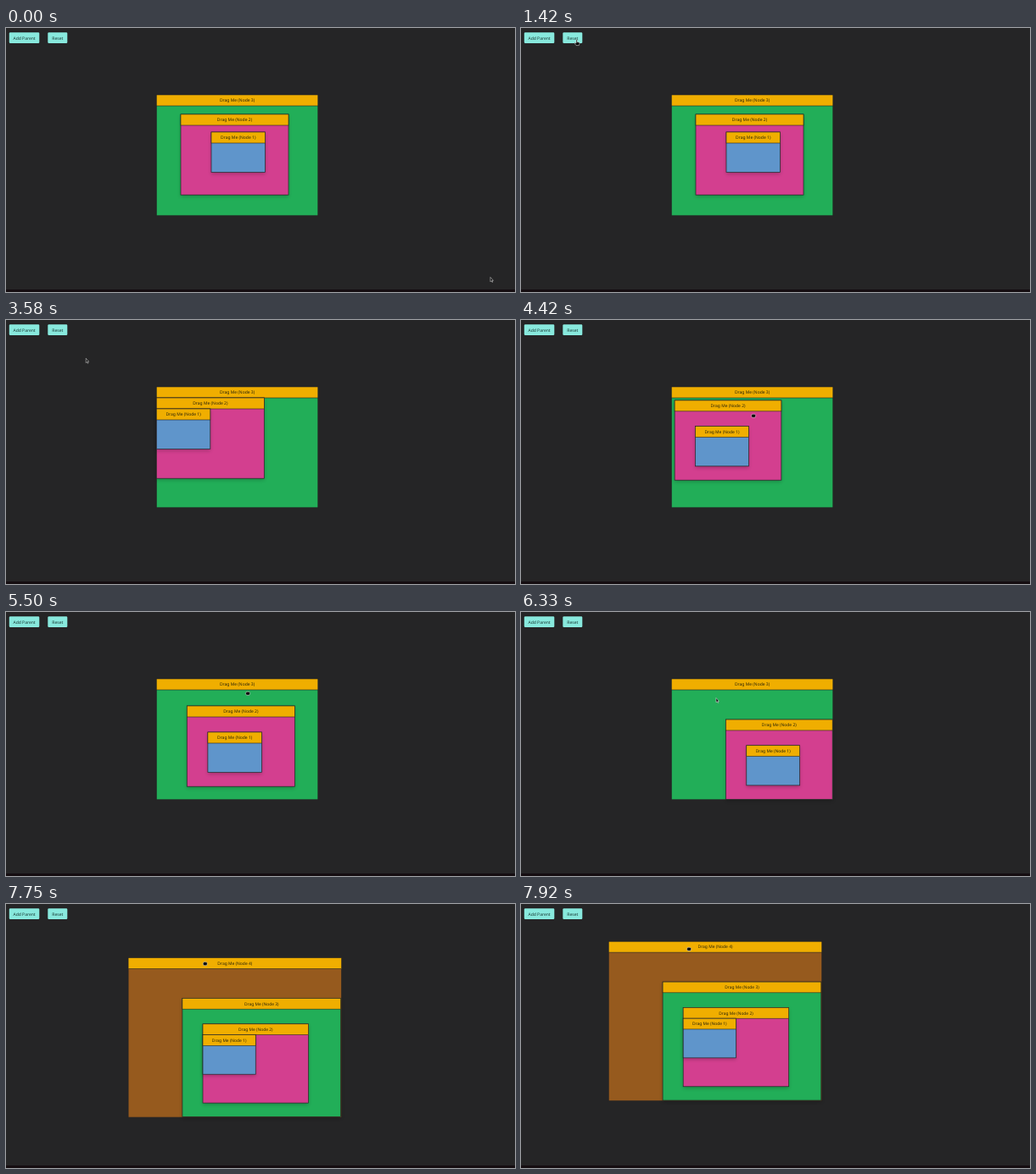
An HTML page for the animation above (8000 ms loop, 600 by 312 pixels).

```html
<!DOCTYPE html>
<html lang="en">
<head>
<meta charset="utf-8">
<title>Nested draggable nodes</title>
<style>
  html, body { margin: 0; width: 100%; height: 100%; overflow: hidden; background: #252526; }
  svg { display: block; width: 100vw; height: 100vh; }
  text {
    font: 5px "Noto Sans", "Open Sans", sans-serif;
    text-anchor: middle;
    text-rendering: geometricPrecision;
    fill: #2b2509;
  }
  .button rect { fill: #88e9dd; }
  .button text { fill: #173733; }
  .node > .body { stroke: #242424; stroke-width: .7; }
  .node > .bar { fill: #f0ae00; stroke: #242424; stroke-width: .6; }
  .node > .shade { fill: #000; opacity: .22; filter: url(#blur); }
  .cursor { fill: #0b0b0b; stroke: #e8e8e8; stroke-width: .5; stroke-linejoin: round; }
</style>
</head>
<body>
<svg id="stage" viewBox="0 0 600 312" preserveAspectRatio="none">
  <defs>
    <filter id="blur" x="-20%" y="-20%" width="140%" height="140%">
      <feGaussianBlur stdDeviation="2"/>
    </filter>
  </defs>
  <rect width="600" height="312" fill="#252526"/>
  <rect y="309" width="600" height="3" fill="#150d11"/>
</svg>
<script>
const LOOP = 8000;
const UNIT = { w: 63.5, h: 47.6, bar: 13 };
const ROOT = [177.3, 79];
const FILLS = ['#5f95cb', '#d33f8f', '#22ae58', '#965a1e'];
const RESET = 1500, ADD_2 = 2660, ADD_3 = 3000, ADD_4 = 6920;

// Each row: time, then values
const CURSOR = [
  [80, 571, 297], [830, 64, 14], [920, 65, 15], [1420, 66, 17], [1750, 66, 17],
  [2000, 28, 15], [3420, 28, 15], [3830, 222, 111], [4170, 247, 129],
  [4320, 270, 100], [4420, 274, 113], [4950, 296, 112], [5500, 285, 96],
  [5900, 321, 134], [6080, 321, 134], [6750, 33, 39], [6860, 31, 16],
  [6980, 31, 17], [7170, 35, 23], [7580, 272, 88], [7920, 198, 53]
];
const DRAG_1 = [[3830, 0, 13], [4170, 24.6, 31]];
const DRAG_2 = [[4320, 0, 13], [4420, 3.2, 15.5], [4950, 26, 24], [5500, 36, 32], [5900, 63.5, 47.6]];
const DRAG_4 = [[7600, 0, 0], [7920, -75.3, -35.7]];
const GRIP_2 = [[4320, 1], [4400, .99], [5350, .99], [5450, 1], [5600, 1], [5700, .99]];
const GRIP_4 = [[7600, 1], [7680, .99]];

const svg = document.getElementById('stage');

function add(parent, tag, attrs, text) {
  const el = document.createElementNS('http://www.w3.org/2000/svg', tag);
  for (const key in attrs) el.setAttribute(key, attrs[key]);
  if (text) el.textContent = text;
  parent.appendChild(el);
  return el;
}

function track(rows, t) {
  if (t <= rows[0][0]) return rows[0].slice(1);
  const i = rows.findIndex(row => row[0] > t);
  if (i < 0) return rows[rows.length - 1].slice(1);
  const a = rows[i - 1], b = rows[i];
  const p = (t - a[0]) / (b[0] - a[0]);
  const k = p * p * (3 - 2 * p);
  return a.slice(1).map((v, n) => v + (b[n + 1] - v) * k);
}

function addButton(x, w, label) {
  const g = add(svg, 'g', { class: 'button' });
  add(g, 'rect', { x, y: 5.3, width: w, height: 12.7, rx: 1.2 });
  add(g, 'text', { x: x + w / 2, y: 13.5 }, label);
}

function addNode(parent, n) {
  const w = UNIT.w * n, h = UNIT.h * n;
  const el = add(parent, 'g', { class: 'node' });
  const shade = add(el, 'rect', { class: 'shade', y: 2, width: w, height: h });
  add(el, 'rect', { class: 'body', width: w, height: h, fill: FILLS[n - 1] });
  add(el, 'rect', { class: 'bar', width: w, height: UNIT.bar });
  add(el, 'text', { x: w / 2, y: 8.3 }, `Drag Me (Node ${n})`);
  return { el, shade, w, h };
}

addButton(3.8, 35.5, 'Add Parent');
addButton(49.3, 23, 'Reset');

const layer = add(svg, 'g', {});
const nodes = [1, 2, 3, 4].map(n => addNode(layer, n));

const hand = 'M-1 1V-3Q-.4 -3.8 .2 -3V-.6L2.6 0Q3.2 .4 3 1.4L2.3 3.6H-1L-3 .8Q-2.6 -.2 -1 1Z';
const fist = 'M-2 -1Q-1.6 -2.2 -.8 -1.6Q0 -2.4 .7 -1.6Q1.5 -2.2 2 -1.2Q2.8 -1 2.6 .6L1.8 2.3H-1.4L-2.6 .6Z';
const arrow = 'M0 -2.5V2.8L1.1 1.7L2 3.5L2.8 3.1L2 1.4H3.4Z';
const cursor = add(svg, 'path', { class: 'cursor' });

function cursorShape(t) {
  const within = (a, b) => t >= a && t < b;
  if (within(3830, 4170) || within(4320, 5950) || t >= 7600) return fist;
  if (within(790, 1800) || within(1900, 3480) || within(3800, 4320) ||
      within(5950, 6100) || within(6800, 7220) || within(7540, 7600)) return hand;
  return arrow;
}

function layout(t) {
  if (t < RESET) return [[36, 21], [28.7, 23], [0, 0]].map(p => [...p, 1]);
  if (t < ADD_2) return [[0, 0, 1]];
  const inner = [0, UNIT.bar, 1];
  if (t < ADD_3) return [inner, [0, 0, 1]];
  const first = [...track(DRAG_1, t), 1];
  const second = [...track(DRAG_2, t), ...track(GRIP_2, t)];
  if (t < ADD_4) return [first, second, [0, 0, 1]];
  // A new parent hands each offset one level up
  return [inner, first, second, [...track(DRAG_4, t), ...track(GRIP_4, t)]];
}

function place(t) {
  const states = layout(t);
  let left = ROOT[0], top = ROOT[1], zoom = 1;
  for (let i = nodes.length - 1; i >= 0; i--) {
    const { el, shade, w, h } = nodes[i];
    const state = states[i];
    el.style.display = state ? '' : 'none';
    if (!state) continue;
    const [x, y, s] = state;
    left += (x + w * (1 - s) / 2) * zoom;
    top += (y + h * (1 - s) / 2) * zoom;
    zoom *= s;
    el.setAttribute('transform', `translate(${left} ${top}) scale(${zoom})`);
    shade.style.display = i === states.length - 1 ? 'none' : '';
  }
}

// Parents are painted before their children
[...nodes].reverse().forEach(node => layer.appendChild(node.el));

function draw(now) {
  const t = now % LOOP;
  place(t);
  const [x, y] = track(CURSOR, t);
  cursor.setAttribute('d', cursorShape(t));
  cursor.setAttribute('transform', `translate(${x} ${y})`);
}

const start = performance.now();
function tick() {
  draw(performance.now() - start);
  requestAnimationFrame(tick);
}
tick();
</script>
</body>
</html>
```
